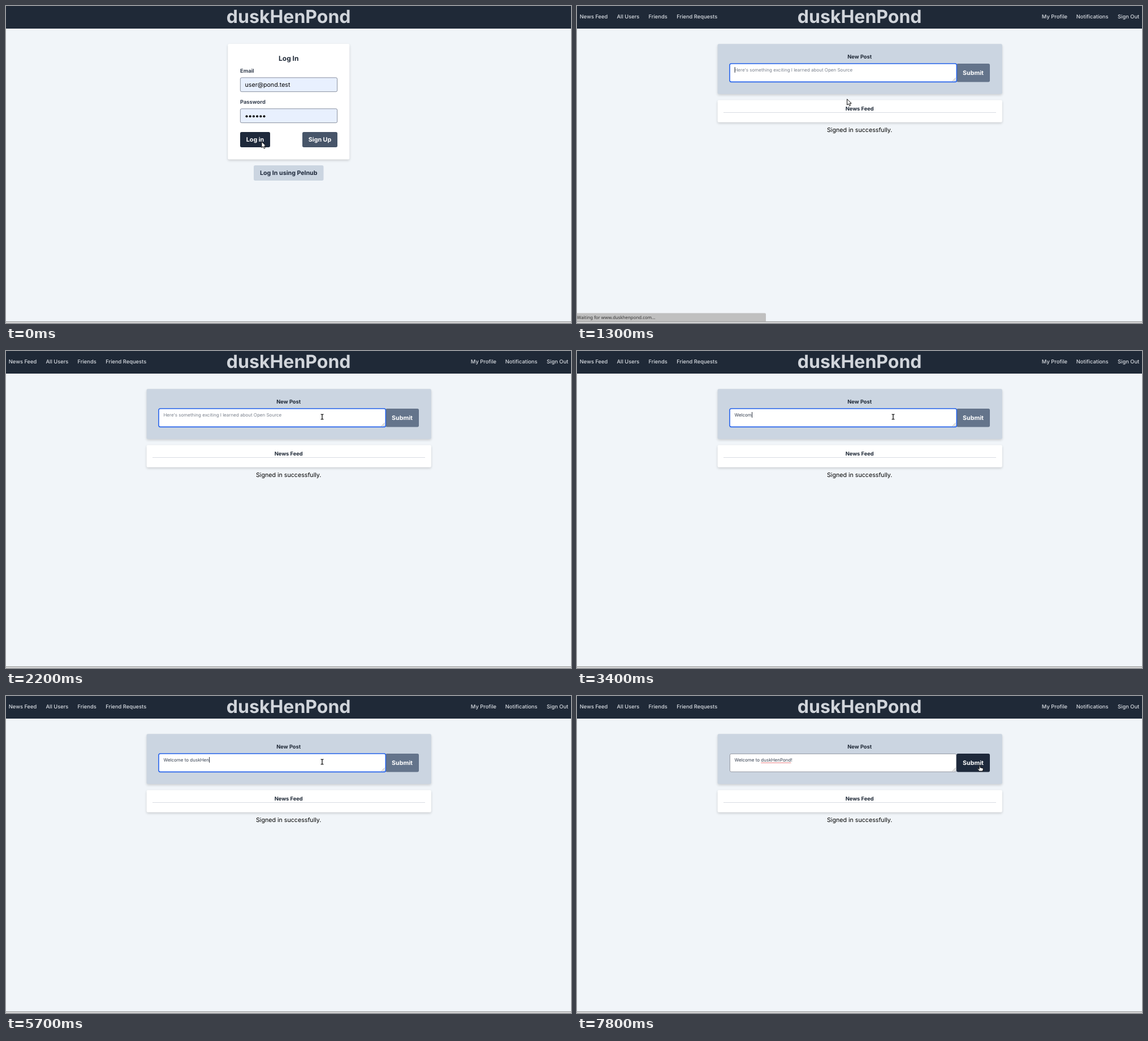
These frames come from a looping animation (999x561 px, 8 s). An HTML page with a canvas:

```html
<!DOCTYPE html>
<html lang="en">
<head>
<meta charset="utf-8">
<title>Sign in and post</title>
<style>
html, body { margin: 0; width: 100%; height: 100%; overflow: hidden; background: #f1f5f9; }
canvas { display: block; }
</style>
</head>
<body>
<canvas id="stage" width="999" height="561"></canvas>
<script>
const ctx = document.getElementById('stage').getContext('2d');
const W = 999, H = 561, LOOP = 8000, STEP = 100;
const BRAND = 'duskHenPond';
const POST = 'Welcome to ' + BRAND + '!';
const HINT = "Here's something exciting I learned about Open Source";
const SANS = 'Inter, sans-serif';
const SMALL = 8, NAV = 9.33, BASE = 10.67;
const TEXT_X = 278.4;

// [time, characters typed]
const TYPED = [[2800, 1], [2900, 2], [3100, 3], [3300, 5], [3400, 6], [3600, 8], [3800, 11],
  [4100, 13], [4300, 15], [4600, 16], [5000, 17], [5700, 18], [6000, 19], [6200, 20], [6400, 22], [6700, 23]];
// [time, caret visible]
const CARET = [[0, true], [2200, false], [2800, true], [5500, false], [5700, true], [7200, false]];
// [time, pointer shape, x, y]
const POINTER = [[0, 'arrow', 451.5, 239.5], [1100, 'arrow', 453, 236], [1200, 'arrow', 462, 208],
  [1300, 'arrow', 477, 164], [1400, 'arrow', 490.5, 131], [1500, 'beam', 498, 121], [1600, 'beam', 504, 118],
  [1700, 'beam', 509, 117], [1800, 'beam', 514, 117.5], [1900, 'beam', 543, 117], [2000, 'beam', 559, 116.5],
  [7400, 'beam', 564.5, 116.5], [7600, 'hand', 708, 121], [7800, 'hand', 712, 122.5]];

function at(track, t) {
  let hit = null;
  for (const key of track) if (key[0] <= t) hit = key;
  return hit;
}

function text(str, x, y, size, color, weight = 400, align = 'left', family = SANS) {
  ctx.font = `${weight} ${size}px ${family}`;
  ctx.textAlign = align;
  ctx.fillStyle = color;
  ctx.fillText(str, x, y);
}

function rect(x, y, w, h, fill, r = 0) {
  ctx.beginPath();
  ctx.roundRect(x, y, w, h, r);
  ctx.fillStyle = fill;
  ctx.fill();
}

function outline(x, y, w, h, color, width, r) {
  ctx.beginPath();
  ctx.roundRect(x, y, w, h, r);
  ctx.strokeStyle = color;
  ctx.lineWidth = width;
  ctx.stroke();
}

function card(x, y, w, h, fill) {
  ctx.save();
  ctx.shadowColor = 'rgba(0,0,0,.16)';
  ctx.shadowBlur = 4.5;
  ctx.shadowOffsetY = 2;
  rect(x, y, w, h, fill, 2.2);
  ctx.restore();
}

function button(label, x, y, w, h, fill, color = '#fff') {
  rect(x, y, w, h, fill, 2.67);
  text(label, x + w / 2, y + h / 2 + 3.9, BASE, color, 700, 'center');
}

function field(y) {
  rect(414, y, 172, 25.5, '#e8f0fe', 2.67);
  outline(414.35, y + .35, 171.3, 24.8, '#6b7280', .75, 2.4);
}

function shell() {
  rect(0, 0, W, H, '#f1f5f9');
  rect(0, 0, W, 40, '#1f2937');
  text(BRAND, 499.7, 30.3, 32, '#d1d5db', 700, 'center');
}

function windowEdge() {
  rect(0, 558, W, 1, '#999');
  rect(0, 559, W, 2, '#d6d6d6');
}

function loginPage() {
  card(392.3, 67, 215, 204.5, '#fff');
  text('Log In', 499.7, 96.8, 12, '#1f2937', 700, 'center');
  text('Email', 414, 117.6, NAV, '#374151', 700);
  field(126.5);
  text('user@pond.test', 422.5, 143, BASE, '#000');
  text('Password', 414, 172.7, NAV, '#374151', 700);
  field(181.5);
  ctx.fillStyle = '#000';
  for (let i = 0; i < 6; i++) {
    ctx.beginPath();
    ctx.arc(425.5 + i * 6.2, 195.2, 2, 0, Math.PI * 2);
    ctx.fill();
  }
  button('Log in', 414, 223, 53, 27, '#1e293b');
  button('Sign Up', 524, 223, 62, 27, '#475569');
  button('Log In using Pelnub', 438, 282, 123.5, 27, '#cbd5e1', '#1e293b');
}

function nav() {
  const links = [['News Feed', 4.8], ['All Users', 70.5], ['Friends', 126.5], ['Friend Requests', 176.2],
    ['My Profile', 821.8], ['Notifications', 882.8], ['Sign Out', 956]];
  for (const [label, x] of links) text(label, x, 22.2, NAV, '#d9dde3', 500);
}

function grip() {
  ctx.strokeStyle = '#777';
  ctx.lineWidth = .7;
  ctx.beginPath();
  for (const d of [5.5, 2.5]) {
    ctx.moveTo(669.5 - d, 133);
    ctx.lineTo(669.5, 133 - d);
  }
  ctx.stroke();
}

function squiggle(x0, x1, y) {
  ctx.beginPath();
  ctx.moveTo(x0, y);
  for (let x = x0; x <= x1; x += .5) ctx.lineTo(x, y + .4 * Math.sin((x - x0) * 2.4));
  ctx.strokeStyle = '#e0393e';
  ctx.lineWidth = .8;
  ctx.stroke();
}

function composer(t) {
  const focused = t < 7800, checked = t >= 7600;
  const typed = POST.slice(0, (at(TYPED, t) || [0, 0])[1]);

  button('Submit', 671, 102, 59, 32.5, checked ? '#1e293b' : '#64748b');
  rect(270, 102, 401, 32.5, '#fff', 2.67);
  if (focused) outline(270, 102, 401.3, 32.4, '#2563eb', 1.6, 2.8);
  else outline(270.35, 102.35, 400.3, 31.8, '#6b7280', .75, 2.4);
  grip();

  if (typed) text(typed, TEXT_X, 116.3, SMALL, '#374151');
  else text(HINT, TEXT_X, 116.3, SMALL, '#7a808c');

  const typedWidth = ctx.measureText(typed).width;
  if (checked) {
    const start = TEXT_X + ctx.measureText('Welcome to ').width;
    squiggle(start, start + ctx.measureText(BRAND).width, 118.2);
  }
  if (focused && at(CARET, t)[1]) rect(TEXT_X + typedWidth + .3, 108, .9, 10, '#111827');
}

function statusBar(t) {
  const alpha = t < 1400 ? 1 : t < 1500 ? .05 : 0;
  if (!alpha) return;
  ctx.globalAlpha = alpha;
  rect(0, 543.5, 334, 14.5, '#c0c0c0', [0, 2, 0, 0]);
  text('Waiting for www.duskhenpond.com...', 0, 553.8, 7.85, '#333', 400, 'left', '"Noto Sans", sans-serif');
  ctx.globalAlpha = 1;
}

function feedPage(t) {
  nav();
  card(248.6, 67.3, 503.2, 88.4, '#cbd5e1');
  text('New Post', 499.7, 93.4, NAV, '#1f2937', 700, 'center');
  composer(t);
  card(248.6, 166.6, 503.2, 39.2, '#fff');
  text('News Feed', 499.7, 184.7, NAV, '#1f2937', 700, 'center');
  rect(259, 188.3, 482, .8, '#cdd1d8');
  text('Signed in successfully.', 499.7, 223, BASE, '#000', 400, 'center');
  statusBar(t);
}

const shapes = {
  arrow() {
    const p = new Path2D('M.5 .8V11.2L3 9L4.7 12.7L6.6 11.9L5 8.3H8.2Z');
    ctx.lineWidth = 1;
    ctx.strokeStyle = '#111';
    ctx.fillStyle = '#fff';
    ctx.fill(p);
    ctx.stroke(p);
  },
  beam() {
    const p = new Path2D('M-2.4 -4.3H-.8L0 -3.7L.8 -4.3H2.4M0 -3.7V3.7M-2.4 4.3H-.8L0 3.7L.8 4.3H2.4');
    for (const [color, width] of [['#fff', 2.6], ['#111', 1.3]]) {
      ctx.strokeStyle = color;
      ctx.lineWidth = width;
      ctx.stroke(p);
    }
  },
  hand() {
    const p = new Path2D('M-.9 .8Q0 -.3 .9 .8V4.2L5 5Q6.4 5.4 6.2 7L5.4 10.5H-.8L-3.6 6.7Q-3.5 5.5 -2.3 6L-.9 7.2Z');
    ctx.lineWidth = 1;
    ctx.strokeStyle = '#111';
    ctx.fillStyle = '#fff';
    ctx.fill(p);
    ctx.stroke(p);
  }
};

function pointer(t) {
  const [, shape, x, y] = at(POINTER, t);
  ctx.save();
  ctx.translate(x, y);
  ctx.lineJoin = 'round';
  shapes[shape]();
  ctx.restore();
}

function draw(t) {
  ctx.textRendering = 'geometricPrecision';
  shell();
  if (t < 1000) loginPage();
  else feedPage(t);
  windowEdge();
  pointer(t);
}

const start = performance.now();
function tick() {
  const t = (performance.now() - start) % LOOP;
  draw(Math.floor(t / STEP) * STEP);
  requestAnimationFrame(tick);
}
tick();
</script>
</body>
</html>
```
